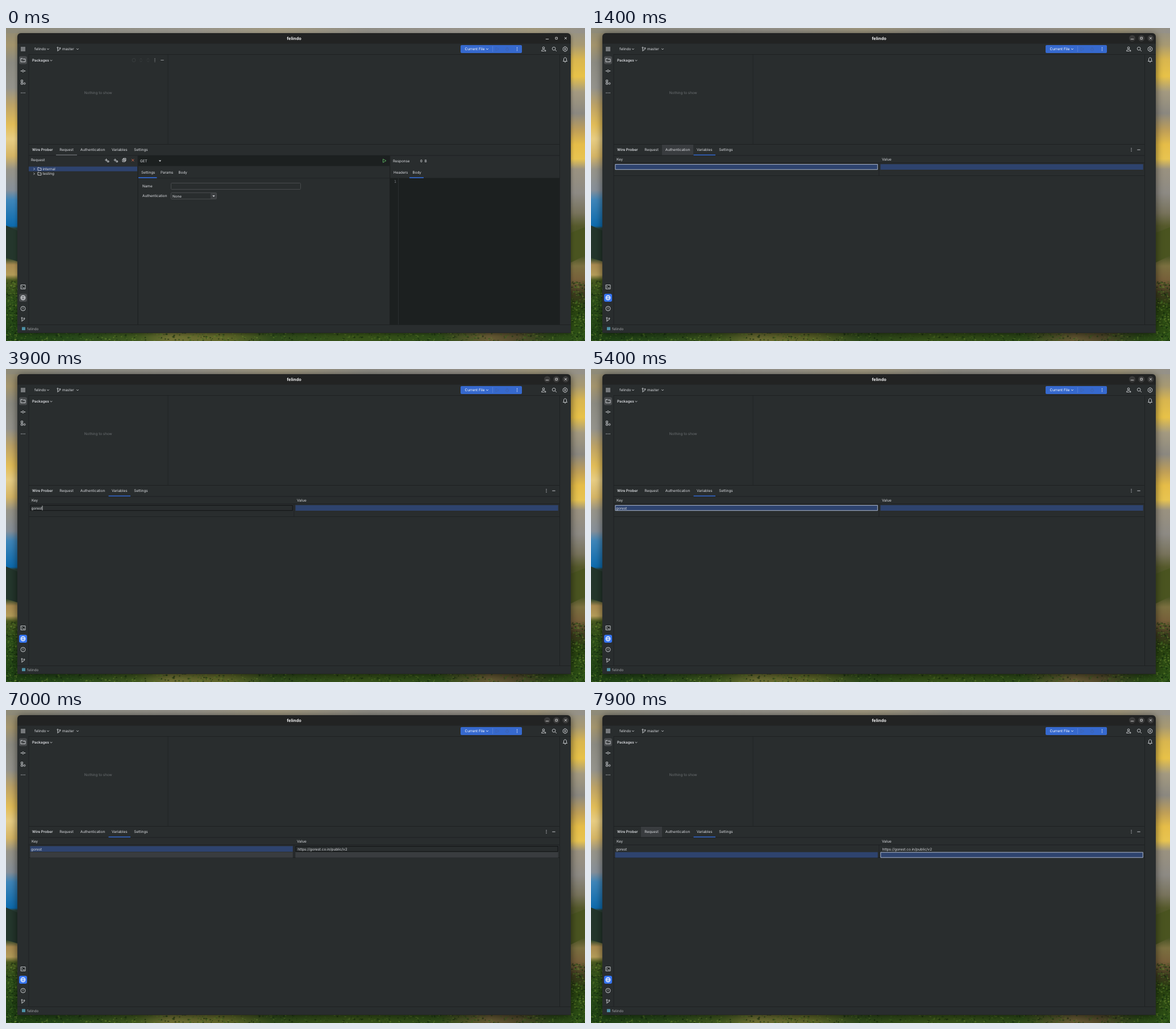
These frames come from a looping animation (1019 by 550 pixels, 8000 ms). An HTML page with a canvas:

```html
<!DOCTYPE html>
<html lang="en">
<head>
<meta charset="utf-8">
<title>Request tool window</title>
<style>
html, body { margin: 0; width: 100%; height: 100%; overflow: hidden; background: #2e4420; }
canvas { display: block; width: 1019px; height: 550px; }
</style>
</head>
<body>
<canvas id="stage"></canvas>
<script>
const W = 1019, H = 550, LOOP = 8000;
const PROJECT = 'felindo', TOOL = 'Wire Prober';
const BG = '#292d2e', LINE = '#1e2122', DARK = '#1c2020', TEXT = '#dcdee2', DIM = '#6c7073',
      BLUE = '#3574f0', SELECT = '#2e436e', HOVER = '#393c3f';
const canvas = document.getElementById('stage');
const scale = window.devicePixelRatio || 1;
canvas.width = W * scale;
canvas.height = H * scale;
let ctx = canvas.getContext('2d');

function rect(x, y, w, h, color, radius = 0) {
  ctx.fillStyle = color;
  ctx.beginPath();
  ctx.roundRect(x, y, w, h, radius);
  ctx.fill();
}

function frame(x, y, w, h, color, radius = 0) {
  ctx.strokeStyle = color;
  ctx.lineWidth = 1;
  ctx.beginPath();
  ctx.roundRect(x + .5, y + .5, w - 1, h - 1, radius);
  ctx.stroke();
}

// y is the middle of the capital letters
function text(str, x, y, { color = TEXT, weight = 400, size = 6.35, family = 'Inter, sans-serif', align = 'left' } = {}) {
  ctx.font = `${weight} ${size}px ${family}`;
  ctx.textRendering = 'geometricPrecision';
  ctx.textAlign = align;
  ctx.fillStyle = color;
  ctx.fillText(str, x, y + size * .36);
}

const ICONS = {
  menu: 'M-4-3H4M-4-1H4M-4 1H4M-4 3H4',
  folder: 'M-4-3H-1L0-2H4V3H-4Z',
  smallFolder: 'M-3-2.5H-1L0-1.5H3V2.5H-3Z',
  commit: 'M-4.500 0H-1.800M1.800 0H4.500M1.800 0A1.800 1.800 0 1 1-1.800 0A1.800 1.800 0 1 1 1.800 0',
  blocks: 'M-3.500-3.500H-.5V-.5H-3.500ZM-3.500 1H-.5V4H-3.500ZM4 2.500A1.500 1.500 0 1 1 1 2.500A1.500 1.500 0 1 1 4 2.500',
  terminal: 'M-4-3.500H4V3.500H-4ZM-2.500-1.500L-1 0L-2.500 1.500M0 1.500H2.500',
  globe: 'M4 0A4 4 0 1 1-4 0A4 4 0 1 1 4 0ZM-4 0H4M0-4C-2.500-2-2.500 2 0 4C2.500 2 2.500-2 0-4',
  problem: 'M4 0A4 4 0 1 1-4 0A4 4 0 1 1 4 0ZM0-2.200V.5M0 1.500V2.300',
  branch: 'M-2-1.500V4M-2 2C1 2 2 1 2-.5M-1-2.500A1 1 0 1 1-3-2.500A1 1 0 1 1-1-2.500M3-1.500A1 1 0 1 1 1-1.500A1 1 0 1 1 3-1.500',
  person: 'M1.800-2A1.800 1.800 0 1 1-1.800-2A1.800 1.800 0 1 1 1.800-2M-3.500 3.500C-3.500 0 2 0 2.500 1.500M-3.500 3.500H1M1.500 3H4.500M3 1.500V4.500',
  search: 'M2-.7A2.800 2.800 0 1 1-3.600-.7A2.800 2.800 0 1 1 2-.7M1.300 1.300L4 4',
  gear: 'M-1.300-4H1.300L1.800-2.700L3.200-2.500L4-.8L3.200 0L4 .8L3.200 2.500L1.800 2.700L1.300 4H-1.300L-1.800 2.700L-3.200 2.500L-4 .8L-3.200 0L-4-.8L-3.200-2.500L-1.800-2.700ZM1.200 0A1.200 1.200 0 1 1-1.200 0A1.200 1.200 0 1 1 1.200 0',
  bell: 'M-3.500 2.500L-2.500 1V-1C-2.500-5 2.500-5 2.500-1V1L3.500 2.500ZM-1 4H1',
  down: 'M-1.800-.9L0 .9L1.800-.9',
  right: 'M-.9-1.800L.9 0L-.9 1.800',
  play: 'M-2.500-3L3 0L-2.500 3Z',
  bug: 'M-2-1H2V2L0 3.500L-2 2ZM-1.500-1C-1.500-3.500 1.500-3.500 1.500-1M-3.500 1H-2M2 1H3.500',
  minus: 'M-2.700 0H2.700',
  cross: 'M-2-2L2 2M2-2L-2 2',
  square: 'M-1.700-1.700H1.700V1.700H-1.700Z',
  addFolder: 'M-3.500-.5H1.500M-1-3V2M1 1H3.500V3H1Z',
  copy: 'M-3-1.500H1.500V3H-3ZM-1.500-1.500V-3H3V1.500H1.500M-2 .8H.7M-.7-.5V2',
  target: 'M3 0A3 3 0 1 1-3 0A3 3 0 1 1 3 0',
  expand: 'M-2-1L0-3L2-1M-2 1L0 3L2 1',
};
for (const name in ICONS) ICONS[name] = new Path2D(ICONS[name]);

function icon(name, x, y, color = TEXT, width = .85) {
  ctx.save();
  ctx.translate(x, y);
  ctx.strokeStyle = color;
  ctx.lineWidth = width;
  ctx.stroke(ICONS[name]);
  ctx.restore();
}

function dots(x, y, dx, dy, color = TEXT) {
  for (const i of [-1, 0, 1]) rect(x + i * dx - .7, y + i * dy - .7, 1.4, 1.4, color, .7);
}

function triangle(x, y) {
  ctx.fillStyle = TEXT;
  ctx.beginPath();
  ctx.moveTo(x - 2.2, y - 1);
  ctx.lineTo(x + 2.2, y - 1);
  ctx.lineTo(x, y + 1.4);
  ctx.fill();
}

function gradient(x, y, w, h, stops, horizontal) {
  const fill = horizontal ? ctx.createLinearGradient(x, 0, x + w, 0) : ctx.createLinearGradient(0, y, 0, y + h);
  for (const stop of stops.split(' ')) {
    const [pos, color] = stop.split('#');
    fill.addColorStop(pos / (horizontal ? W : H), '#' + color);
  }
  rect(x, y, w, h, fill);
}

function polygon(color, ...points) {
  ctx.fillStyle = color;
  ctx.beginPath();
  for (const [x, y] of points) ctx.lineTo(x, y);
  ctx.fill();
}

// Wallpaper: soft sky and hills with loose foliage at the bottom
function paintWallpaper() {
  gradient(0, 0, 510, H, '0#8f8a76 30#a3946c 60#8c8b82 105#94938c 135#bda367 170#e2bd58 195#e8cd83 225#d5b566 248#979488 285#868f99 302#3f86b9 348#0d6bae 352#2c4038 405#30472a 416#a88a50 434#b39b58 443#4a5a20 475#2c4d18 550#1f4314');
  gradient(510, 0, 509, H, '0#929088 30#a89a72 55#d9b64f 85#e8c248 112#a49a80 150#8b8880 180#bf9f58 205#e6bd48 230#e8c450 248#9a9280 290#8d8a84 325#78735c 348#565a2c 395#3a4a1c 418#7b7040 442#77603a 466#3d381e 490#28400f 550#2e5216');
  gradient(0, 0, W, 9, '0#8f8b78 120#8f8e86 330#96938a 480#a09880 640#8f8d86 800#96928a 930#a0977c 1019#94918a', true);
  gradient(0, 536, W, 14, '0#1f4314 120#28491a 230#40581f 290#6f7034 390#5d6528 470#2f4a1b 620#375218 760#2e4c18 850#675a34 900#50482a 960#2b4718 1019#2e5216', true);
  polygon('#24362c', [0, 347], [20, 356], [20, 410], [0, 404]);
  polygon('#4a5420', [994, 360], [1019, 350], [1019, 400], [994, 412]);
  let seed = 7;
  const random = () => (seed = seed * 16807 % 2147483647) / 2147483647;
  const greens = ['#10240c', '#1c3a12', '#3c6420', '#66852f'];
  ctx.globalAlpha = .55;
  for (let i = 0; i < 1100; i++) {
    const side = random() < .45, y = side ? 444 + random() * 106 : 534 + random() * 16;
    let x = random() * W;
    if (side) x = i % 2 ? x * 20 / W : 994 + x * 25 / W;
    rect(x, y, 1 + random() * 3, 1 + random() * 2, greens[Math.floor(random() * 4)], 1);
  }
  ctx.globalAlpha = 1;
}

const wallpaper = document.createElement('canvas');
wallpaper.width = canvas.width;
wallpaper.height = canvas.height;
const screen = ctx;
ctx = wallpaper.getContext('2d');
ctx.scale(scale, scale);
paintWallpaper();
ctx = screen;
ctx.scale(scale, scale);

function drawWindow(active) {
  ctx.save();
  ctx.shadowColor = active ? 'rgba(0,0,0,.6)' : 'rgba(0,0,0,.4)';
  ctx.shadowBlur = (active ? 14 : 6) * scale;
  ctx.shadowOffsetY = 2 * scale;
  rect(20, 9, 974, 527, '#222323', [6, 6, 0, 0]);
  ctx.restore();
  rect(20, 27.5, 974, 508, BG);
  text(PROJECT, 507, 18.2, { weight: 700, size: 7.3, family: '"Open Sans", sans-serif', align: 'center', color: '#f2f2f2' });
  ['minus', 'square', 'cross'].forEach((name, i) => {
    const x = 952.5 + i * 16.2;
    if (active) rect(x - 5.5, 12.5, 11, 11, '#3b3b3b', 5.5);
    icon(name, x, name === 'minus' ? 19.5 : 18, '#eeeeee', .8);
  });
}

function drawChrome(t) {
  icon('menu', 30, 37);
  text(PROJECT, 50, 37);
  icon('down', 74, 37);
  icon('branch', 93, 37);
  text('master', 99, 37);
  icon('down', 126, 37);
  rect(800, 30, 108, 14, '#3669ce', 2);
  text('Current File', 807.5, 37, { color: '#fff' });
  icon('down', 847, 37, '#fff');
  rect(856, 32, .8, 10, '#5b86d9');
  icon('play', 864.5, 37, '#3f64ae');
  icon('bug', 882, 37, '#3f64ae');
  dots(899.5, 37, 0, 2.6, '#fff');
  icon('person', 946, 37);
  icon('search', 965, 37);
  icon('gear', 984, 37);
  icon('bell', 984, 56);

  rect(40, 46, 954, 1, LINE);
  rect(39.5, 46, 1, 475, LINE);
  rect(974, 46, 1, 475, LINE);
  rect(284.7, 46, .7, 158, LINE);
  rect(40, 204, 934, 1, LINE);
  rect(20, 521, 974, 1, LINE);

  rect(23, 49.5, 14, 14, '#484b4d', 3);
  icon('folder', 30, 56.5);
  icon('commit', 30, 75.5);
  icon('blocks', 30, 95);
  dots(30, 114, 3, 0);
  icon('terminal', 30, 455);
  rect(23, 467, 14, 14, t < 1200 ? '#484b4d' : BLUE, 3);
  icon('globe', 30, 474, t < 1200 ? TEXT : '#fff', 1);
  icon('problem', 30, 493);
  icon('branch', 30, 512);

  text('Packages', 46, 56.5, { weight: 600 });
  icon('down', 79.5, 57);
  text('Nothing to show', 162.3, 114, { color: DIM, align: 'center' });
  if (t < 100) {
    icon('target', 225, 56.5, '#3d4143');
    icon('expand', 237.5, 56.5, '#3d4143');
    icon('expand', 250, 56.5, '#3d4143');
    dots(262, 56.5, 0, 2.6, '#aaadb0');
    icon('minus', 275, 56.5, '#aaadb0');
  }
  rect(28, 525.5, 6, 5.5, '#4c90a5', .5);
  text(PROJECT, 37, 528.7, { color: '#a2a5a8' });
}

function drawTabs(t) {
  const tabs = { Request: [88, 37], Authentication: [125, 55], Variables: [180.5, 38.5], Settings: [219, 37] };
  const hovered = t >= 7900 ? 'Request' : t >= 1500 || t < 800 ? '' : t >= 1400 ? 'Authentication' : 'Variables';
  const selected = t < 1200 ? 'Request' : 'Variables';
  text(TOOL, 46, 214, { weight: 600 });
  for (const [name, [x, w]] of Object.entries(tabs)) {
    if (name === hovered) rect(x, 205, w, 18.5, HOVER);
    text(name, x + w / 2, 214, { align: 'center' });
  }
  rect(40, 223.5, 934, 1, LINE);
  const [x, w] = tabs[selected];
  rect(x, 222.4, w, 1.4, selected === 'Request' ? '#72767a' : BLUE);
  if (t >= 700) {
    dots(951, 214, 0, 2.6);
    icon('minus', 964, 214);
  }
}

function drawRequest(t) {
  text('Request', 44, 232);
  if (t >= 1100) rect(171, 226, 12.5, 12.5, '#484b4d', 2.5);
  icon('addFolder', 177.5, 232.5);
  icon('addFolder', 193, 232.5);
  icon('copy', 208, 232);
  icon('cross', 223.3, 232.3, '#d9694c', 1);
  rect(40, 243.5, 191, 8.3, SELECT);
  ['internal', 'testing'].forEach((name, i) => {
    const y = 247.7 + i * 8.4;
    icon('right', 49.5, y);
    icon('smallFolder', 59, y);
    text(name, 64.5, y);
  });
  rect(231.5, 224, 1.2, 297, LINE);
  rect(232.7, 224, 442.3, 18.5, DARK);
  text('GET', 236, 233.5);
  triangle(271, 233.5);
  icon('play', 666, 233.3, '#57a85c', 1);
  text('Settings', 238, 254);
  text('Params', 272, 254);
  text('Body', 303.5, 254);
  rect(233, 263.5, 442, .8, LINE);
  rect(233, 262.3, 32.5, 1.4, BLUE);
  text('Name', 240, 278);
  frame(290, 272, 229, 12, '#484b4d', 1);
  text('Authentication', 240, 295);
  frame(290, 289, 81, 12, '#484b4d', 1);
  text('None', 293, 295.3);
  rect(360, 290, 10, 10, '#3b3e40');
  triangle(365.5, 295.3);

  rect(675, 224, 1.2, 297, LINE);
  text('Response', 681, 233.5);
  text('0 B', 729, 233.7, { size: 6.4, family: '"DejaVu Sans Mono", monospace' });
  text('Headers', 682, 254);
  text('Body', 715.5, 254);
  rect(676, 263.5, 298, 257.5, DARK);
  rect(710, 262.3, 25, 1.4, BLUE);
  rect(690, 264, .8, 257, '#303436');
  text('1', 683, 269.5, { size: 6.4, color: '#80848a', family: '"DejaVu Sans Mono", monospace' });
}

function cell(column, row, { fill, border }) {
  const x = column ? 509 : 42, y = row ? 249.5 : 239;
  rect(x + .5, y + .3, 462.2, 9.8, fill);
  if (border) frame(x + .3, y + .1, 462.5, 10.1, border);
}

function caret(x) {
  rect(x, 240, .8, 8.5, '#d8dadd');
}

function drawTable(t) {
  const key = 'gorest', url = 'https://gorest.co.in/public/v2';
  const typed = [3100, 3300, 3500, 3600, 3700, 3900].filter(time => t >= time).length;
  const editingKey = t >= 2200 && t < 5400, editingUrl = t >= 5600 && t < 7300;
  const editor = { fill: BG, border: '#111314' }, selected = { fill: SELECT };
  const focused = { fill: SELECT, border: '#aab4c8' }, hovered = { fill: HOVER };

  text('Key', 45, 230.7);
  text('Value', 512, 230.7);
  rect(40, 236.5, 934, 1, LINE);
  rect(40, 259, 934, 1, LINE);
  rect(506.5, 237, .8, 22, LINE);

  if (t < 7300) {
    cell(0, 0, editingKey ? editor : t < 5500 ? focused : selected);
    cell(1, 0, editingUrl ? editor : t >= 5500 ? focused : selected);
    if (t >= 6400) for (const column of [0, 1]) cell(column, 1, hovered);
  } else {
    if (t >= 7500 && t < 7700) for (const column of [0, 1]) cell(column, 0, hovered);
    cell(0, 1, selected);
    cell(1, 1, focused);
  }

  const keyX = editingKey ? 44.5 : 44;
  text(key.slice(0, typed), keyX, 244.3);
  if (editingKey && !(t >= 2700 && t < 3100) && !(t >= 4400 && t < 4900))
    caret(keyX + ctx.measureText(key.slice(0, typed)).width);
  if (t >= 6400) text(url, editingUrl ? 513.3 : 512.8, 244.3);
  if (editingUrl && t < 6200) caret(511.3);
  if (t >= 6400 && t < 7000) caret(601.5);
}

function draw(now) {
  const t = now % LOOP;
  ctx.drawImage(wallpaper, 0, 0, W, H);
  drawWindow(t >= 1100);
  drawChrome(t);
  drawTabs(t);
  if (t < 1200) drawRequest(t);
  else drawTable(t);
}

const start = performance.now();
function tick() {
  draw(performance.now() - start);
  requestAnimationFrame(tick);
}
tick();
</script>
</body>
</html>
```
